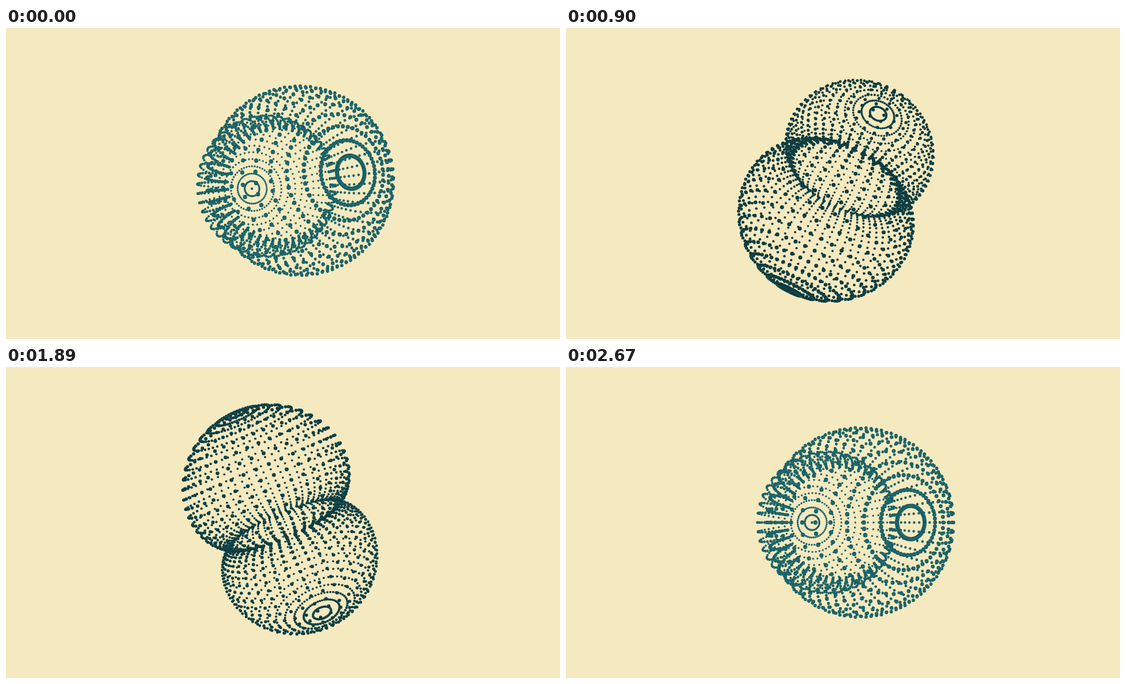
These frames come from a looping animation (960 by 540 pixels, 2700 ms). An HTML page with a canvas:

```html
<!DOCTYPE html>
<html lang="en">
<head>
<meta charset="utf-8">
<title>Rotating nephroid of dots</title>
<style>
  html, body { margin: 0; width: 100%; height: 100%; overflow: hidden; background: #f5e9c0; }
  canvas { display: block; }
</style>
</head>
<body>
<canvas id="stage" width="960" height="540"></canvas>
<script>
const ctx = document.getElementById('stage').getContext('2d');
const W = 960, H = 540;
const STEP = 30, STEPS = 90;
const TOTAL = 50;
const CAMERA = H / 2 / Math.tan(Math.PI / 6);
const TILT = 0.396;
const SIZE = 48;
const DOT = 2.3;

// A nephroid turned around the axis through its two lobes; the cusps form the waist.
function buildPoints() {
  const list = [];
  const c = Math.cos(TILT), s = Math.sin(TILT);
  for (let i = 0; i < TOTAL; i++) {
    const t = Math.PI * (1 - i / TOTAL);
    const along = SIZE * (3 * Math.cos(t) + Math.cos(3 * t));
    const ring = SIZE * (3 * Math.sin(t) + Math.sin(3 * t));
    for (let j = 0; j < TOTAL; j++) {
      const lon = 2 * Math.PI * j / TOTAL;
      const across = ring * Math.cos(lon);
      list.push({
        x: along * s + across * c,
        y: ring * Math.sin(lon),
        z: along * c - across * s
      });
    }
  }
  return list;
}

// Shading of a unit ball under a light that turns with the shape.
function ballShade(angle) {
  const g = ctx.createLinearGradient(0, -1, 0, 1);
  for (let i = 0; i <= 10; i++) {
    const v = i / 5 - 1;
    const lit = Math.max(0, v * Math.sin(angle) + Math.sqrt(1 - v * v) * Math.cos(angle));
    const mix = (base, gain) => Math.round(base + gain * lit);
    g.addColorStop(i / 10, `rgb(${mix(15, 13)},${mix(59, 47)},${mix(63, 48)})`);
  }
  return g;
}

const points = buildPoints();

function draw(time) {
  const step = Math.floor(time / STEP) % STEPS;
  const angle = 2 * Math.PI * (step + 1) / STEPS;
  const c = Math.cos(angle), s = Math.sin(angle);

  ctx.setTransform(1, 0, 0, 1, 0, 0);
  ctx.fillStyle = '#f5e9c0';
  ctx.fillRect(0, 0, W, H);
  ctx.fillStyle = ballShade(angle);

  const turned = points.map(p => ({
    x: p.x,
    y: p.y * c + p.z * s,
    z: p.z * c - p.y * s
  }));
  turned.sort((a, b) => a.z - b.z);

  for (const p of turned) {
    const k = CAMERA / (CAMERA - p.z);
    ctx.setTransform(DOT * k, 0, 0, DOT * k, W / 2 + p.x * k, H / 2 - p.y * k);
    ctx.beginPath();
    ctx.arc(0, 0, 1, 0, 2 * Math.PI);
    ctx.fill();
  }
}

function tick() {
  draw(performance.now());
  requestAnimationFrame(tick);
}
tick();
</script>
</body>
</html>
```
